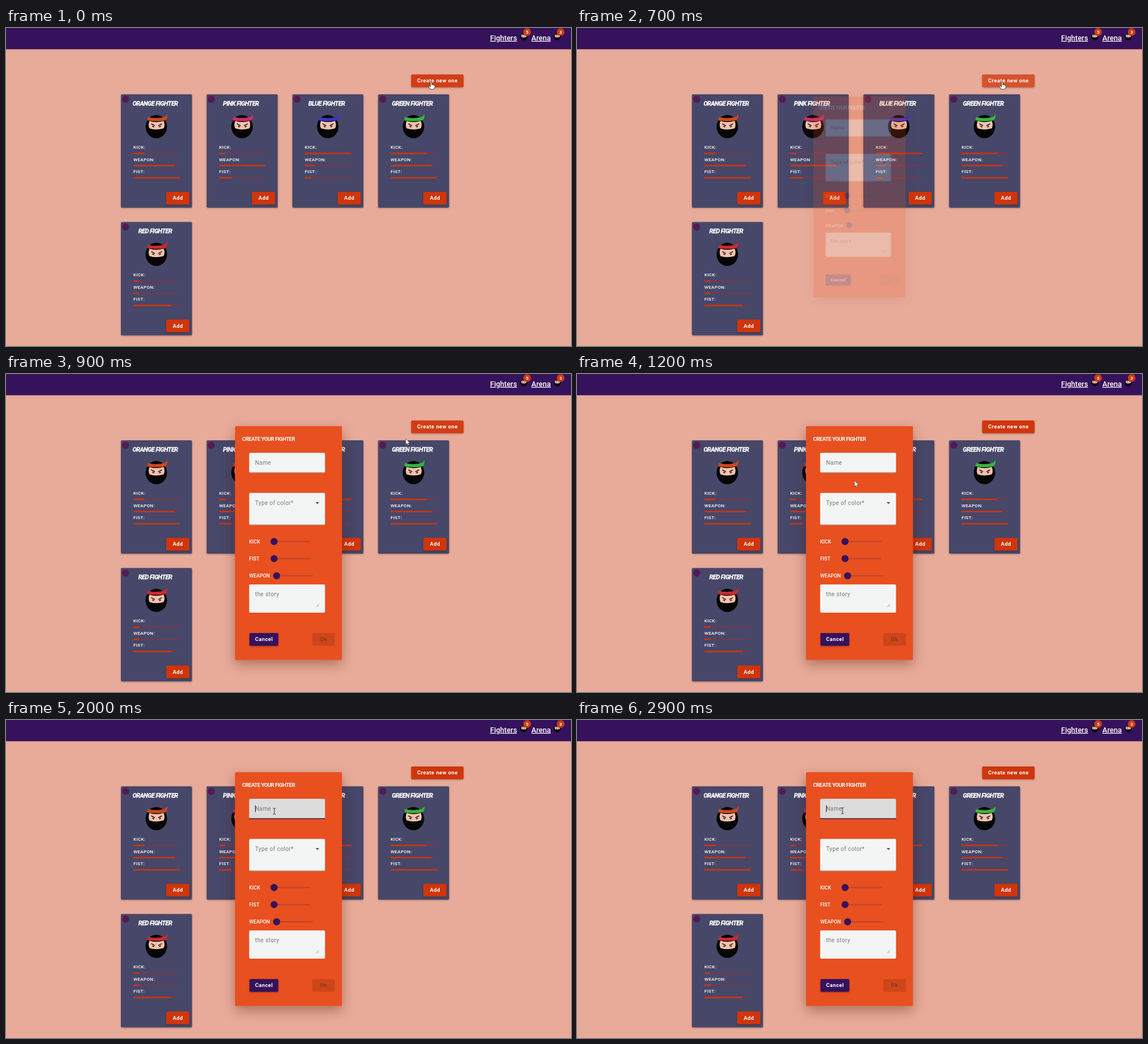
Recreate the animation shown at these times as an HTML page. Size 998x561 px, loop 3000 ms.

```html
<!DOCTYPE html>
<html lang="en">
<head>
<meta charset="utf-8">
<title>Fighters</title>
<style>
  html, body { margin: 0; width: 100%; height: 100%; overflow: hidden; background: #e8ab99; }
  svg { display: block; width: 100vw; height: 100vh; font-family: Roboto, sans-serif; }
  text { fill: #fff; white-space: pre; }
  .nav { font-size: 13px; font-weight: 500; text-decoration: underline; }
  .badge { font-size: 8px; font-weight: 700; text-anchor: middle; }
  .title { font-size: 11px; font-weight: 700; font-style: italic; letter-spacing: -.55px; text-anchor: middle; stroke: #fff; stroke-width: .3px; }
  .heading { font-size: 9.5px; font-weight: 700; letter-spacing: -.48px; }
  .stat { font-size: 8px; font-weight: 500; letter-spacing: .35px; }
  .slider { font-size: 8.8px; font-weight: 500; }
  .button { font-size: 9.3px; font-weight: 700; letter-spacing: .5px; text-anchor: middle; }
  .hint { font-size: 10px; letter-spacing: .42px; fill: #777; }
  .raised { filter: drop-shadow(0 1.5px 1.5px rgba(0, 0, 0, .3)); }
  #dialog { filter: drop-shadow(0 8px 11px rgba(70, 15, 0, .36)); }
</style>
</head>
<body>
<svg id="stage" viewBox="0 0 998 561"></svg>
<script>
const PURPLE = '#36115c', RED = '#d0350b', FIELD = '#f3f5f5';
const fighters = [
  ['ORANGE', '#d0461a', .24, .89, 1],
  ['PINK', '#d12a6c', .13, 1, .27],
  ['BLUE', '#3a34c4', 1, .21, .14],
  ['GREEN', '#35b53c', .78, .88, 1],
  ['RED', '#cc2a30', .13, .13, .82]
];

const rect = (x, y, w, h, fill, more = '') =>
  `<rect x="${x}" y="${y}" width="${w}" height="${h}" fill="${fill}" ${more}/>`;
const circle = (x, y, r, fill) => `<circle cx="${x}" cy="${y}" r="${r}" fill="${fill}"/>`;
const text = (x, y, kind, words, more = '') =>
  `<text x="${x}" y="${y}" class="${kind}" ${more}>${words}</text>`;
const at = (x, y, content, scale = 1) =>
  `<g transform="translate(${x} ${y}) scale(${scale})">${content}</g>`;
const button = (x, y, w, label, fill = RED) =>
  rect(x, y, w, 22.5, fill, 'rx="2" class="raised"') + text(x + w / 2 + .2, y + 14.4, 'button', label);

const ninja = band => `
  <ellipse rx="19" ry="20.5" fill="#050505"/>
  <path d="M-12 -10Q0 -6 13 -10Q16 -3 13 3Q0 7 -12 3Q-15 -3 -12 -10Z" fill="#f1c3ae"/>
  <path d="M-9 -5L-2.500 -1.500M10 -5L3.500 -1.500" stroke="#2a1512" stroke-width="1.500"/>
  <path d="M-7 -1L-4 .8M8 -1L5 .8" stroke="#241414" stroke-width="1.800"/>
  <path d="M-15 -17Q0 -13 14 -17Q18 -18 18.500 -22L19.500 -21Q20 -14 16 -11Q0 -8 -16 -11Z" fill="${band}"/>`;

const bar = (y, value) =>
  rect(22, y, 82, 2.6, '#6c3d50') + rect(22, y, 82 * value, 2.6, '#cf360c', 'rx=".5"');

function card([name, color, ...values], i) {
  const stats = ['KICK:', 'WEAPON:', 'FIST:'].map((label, k) =>
    text(22, 96 + k * 21.5, 'stat', label) + bar(102.9 + k * 21.5, values[k]));
  return at(203 + i % 4 * 151.4, 117 + Math.floor(i / 4) * 225.3,
    rect(0, 0, 125.5, 200, '#474769', 'rx="2" class="raised"') +
    circle(8.3, 8.8, 6.3, '#521b56') +
    text(60.5, 19.7, 'title', name + ' FIGHTER') +
    at(62.5, 57, ninja(color)) + stats.join('') + button(80, 172, 41, 'Add'));
}

const navItem = (x, label, iconX, count) =>
  text(x, 21.8, 'nav', label) + at(iconX, 15, ninja('#3b3350'), .33) +
  circle(iconX + 6, 7, 6.8, '#cf3a14') + text(iconX + 6, 9.9, 'badge', count);

const slider = (y, label, x) =>
  text(429.5, y + 3.2, 'slider', label) +
  rect(x - 6, y - 1, 70, 2, '#bd4230') + circle(x, y, 6.2, PURPLE);

const dialog =
  rect(404.5, 92, 189, 412.5, '#e8501f', 'rx="2"') +
  text(417, 118.4, 'heading', 'CREATE YOUR FIGHTER') +
  rect(429.5, 139, 134, 35.3, FIELD, 'rx="2" id="nameField"') +
  rect(429.5, 173.3, 134, 1, '#9a8f8c', 'id="nameLine"') +
  text(440, 160, 'hint', 'Name') +
  rect(440, 150.5, 1, 12, '#222', 'id="caret"') +
  rect(429.5, 209.7, 134, 56.5, FIELD, 'rx="2"') + rect(429.5, 265.4, 134, 1, '#a99b97') +
  text(440, 231, 'hint', 'Type of color*') +
  '<path d="M546.800 226h6.600l-3.300 3.400z" fill="#555"/>' +
  slider(295.5, 'KICK', 473.5) + slider(325.7, 'FIST', 473.5) + slider(356, 'WEAPON', 478) +
  rect(429.5, 371.3, 134, 49.7, FIELD, 'rx="2"') +
  text(440, 392, 'hint', 'the story') +
  '<path d="M547.500 411l5-5M550.500 411l2-2" stroke="#888" stroke-width=".8"/>' +
  button(430, 457, 51, 'Cancel', PURPLE) +
  rect(541, 457, 40, 22.5, '#000', 'rx="2" opacity=".12"') +
  text(560.7, 471.4, 'button', 'Ok', 'style="fill:#000;fill-opacity:.28"');

const cursors = `
  <path id="hand" d="M-1.200 .8Q0 -.6 1.100 .8V5Q2.400 4.200 3 5.400Q4.500 4.900 5 6.100Q6.500 5.900 6.500 7.400V9.500L5 13H-1.500L-4.800 8.200Q-4 6.600 -2.500 7.700L-1.200 8.600Z"
    fill="#fff" stroke="#222" stroke-width=".8"/>
  <path id="arrow" d="M0 0V10.500L2.500 8.300L4.100 11.800L5.700 11L4.200 7.700H7.400Z" fill="#fff" stroke="#333" stroke-width=".6"/>
  <path id="beam" d="M-2.500 -5.500Q0 -5.500 0 -4Q0 -5.500 2.500 -5.500M0 -4V4M-2.500 5.500Q0 5.500 0 4Q0 5.500 2.500 5.500" fill="none" stroke="#222" stroke-width=".9"/>`;

document.getElementById('stage').innerHTML =
  rect(0, 0, 998, 561, '#e8ab99') + rect(0, 0, 998, 37.5, PURPLE) +
  navItem(855, 'Fighters', 914.5, 5) + navItem(928, 'Arena', 973.7, 3) +
  button(715.7, 82, 92.5, 'Create new one') +
  rect(715.7, 82, 92.5, 22.5, '#fff', 'rx="2" id="ripple"') +
  fighters.map(card).join('') + `<g id="dialog">${dialog}</g><g id="cursor">${cursors}</g>`;

const el = Object.fromEntries([...document.querySelectorAll('[id]')].map(e => [e.id, e]));
const show = (node, on) => node.setAttribute('visibility', on ? 'visible' : 'hidden');

// Linear interpolation through [time, ...values] keys
function track(keys, t) {
  const next = keys.findIndex(key => key[0] > t);
  if (next < 0) return keys.at(-1).slice(1);
  if (!next) return keys[0].slice(1);
  const a = keys[next - 1], b = keys[next], p = (t - a[0]) / (b[0] - a[0]);
  return a.slice(1).map((v, i) => v + (b[i + 1] - v) * p);
}

const pointer = [[0, 751, 95], [700, 751, 95], [800, 747, 96], [900, 706, 114], [1000, 620, 146],
  [1200, 490, 188], [1500, 448, 193], [1700, 463, 170], [1900, 474, 161], [2000, 474, 161], [2400, 469, 160]];
const ripple = [[0, .04], [400, .04], [600, .12], [700, .14], [800, .06], [900, .04], [1000, 0]];
const opening = [[600, .7, 0], [700, .86, .2], [800, .995, .77], [900, 1, 1]];

function draw(now) {
  const t = Math.floor(now % 3000 / 100) * 100;
  const [x, y] = track(pointer, t);
  const [scale, opacity] = track(opening, t);
  const focused = t >= 1900;
  const overField = t > 1100 && y < 174;

  el.ripple.setAttribute('opacity', track(ripple, t)[0]);
  el.dialog.setAttribute('opacity', opacity);
  el.dialog.setAttribute('transform', `translate(499 298.2) scale(${scale}) translate(-499 -298.2)`);

  el.nameField.setAttribute('fill', focused ? '#dcdcdd' : overField ? '#e8e9e9' : FIELD);
  el.nameLine.setAttribute('fill', focused ? '#25183a' : '#9a8f8c');
  el.nameLine.setAttribute('height', focused ? 1.4 : 1);
  show(el.caret, focused && (t - 1900) % 1000 < 500);

  el.cursor.setAttribute('transform', `translate(${x} ${y})`);
  show(el.hand, t < 900);
  show(el.arrow, t >= 900 && !overField);
  show(el.beam, overField);
}

const start = performance.now();
(function loop() {
  draw(performance.now() - start);
  requestAnimationFrame(loop);
})();
</script>
</body>
</html>
```
